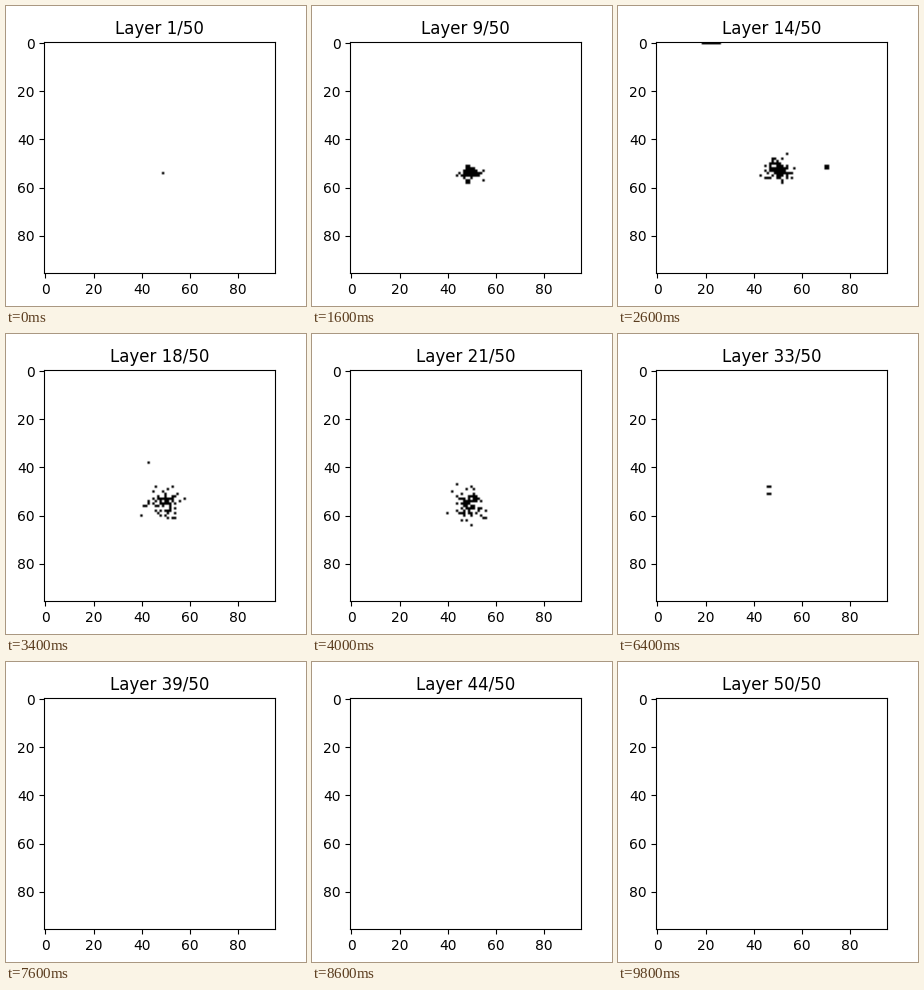
A matplotlib script for the animation above (10000 ms loop, 300x300 px).

```python
import numpy as np
import matplotlib.pyplot as plt
from matplotlib.animation import FuncAnimation

LAYERS, SIZE = 50, 96
LAST_CLUMP, LAST_BAR = 32, 36

# Key layers of the clump: centre, spread and fill are interpolated between.
KEYS = [1, 9, 14, 21, LAST_CLUMP]
CLUMP = {
    "cx": [49, 50, 50.5, 48.5, 47],
    "cy": [54, 53.5, 53, 55.5, 50],
    "sx": [0.2, 2.2, 3.0, 3.2, 2.5],
    "sy": [0.2, 1.5, 2.6, 3.4, 2.5],
    "fill": [1.0, 1.3, 1.2, 0.7, 0.3],
}

# Outlying blocks: column, row, width, height.
OUTLIERS = {
    7: [(65, 65, 1, 1)],
    9: [(48, 57, 2, 2), (55, 53, 1, 1)],
    11: [(4, 0, 8, 1)],
    14: [(19, 0, 8, 1), (70, 51, 2, 2)],
    31: [(89, 91, 1, 1)],
    32: [(13, 92, 1, 1)],
    LAST_BAR + 1: [(48, 51, 1, 1)],
}

rows, cols = np.mgrid[:SIZE, :SIZE]


def clump(layer):
    """Noisy bell-shaped blob, with loose cells once it breaks up."""
    rng = np.random.default_rng(layer)
    p = {name: np.interp(layer, KEYS, vals) for name, vals in CLUMP.items()}
    dist = ((cols - p["cx"]) / p["sx"])**2 + ((rows - p["cy"]) / p["sy"])**2
    mask = rng.random((SIZE, SIZE)) < p["fill"] * np.exp(-dist / 2)
    for _ in range(round(np.interp(layer, [14, 21, LAST_CLUMP], [0, 6, 2]))):
        col, row = np.rint(rng.normal((p["cx"], p["cy"]), 7)).astype(int)
        mask[row, col] = True
    return mask


def slice_mask(layer):
    mask = np.zeros((SIZE, SIZE))
    if layer <= LAST_CLUMP:
        mask[clump(layer)] = 1
    elif layer <= LAST_BAR:
        mask[[48, 51], 46:48] = 1
    for col, row, w, h in OUTLIERS.get(layer, []):
        mask[row:row + h, col:col + w] = 1
    return mask


fig, ax = plt.subplots(figsize=(3, 3), dpi=100)
image = ax.imshow(slice_mask(1), cmap="binary", vmin=0, vmax=1)
ax.set_xticks(range(0, SIZE, 20))
ax.set_yticks(range(0, SIZE, 20))
title = ax.set_title(f"Layer 1/{LAYERS}")


def update(i):
    image.set_data(slice_mask(i + 1))
    title.set_text(f"Layer {i + 1}/{LAYERS}")
    return image, title


anim = FuncAnimation(fig, update, frames=LAYERS, interval=200,
                     repeat=True, repeat_delay=0)
plt.show()
```
